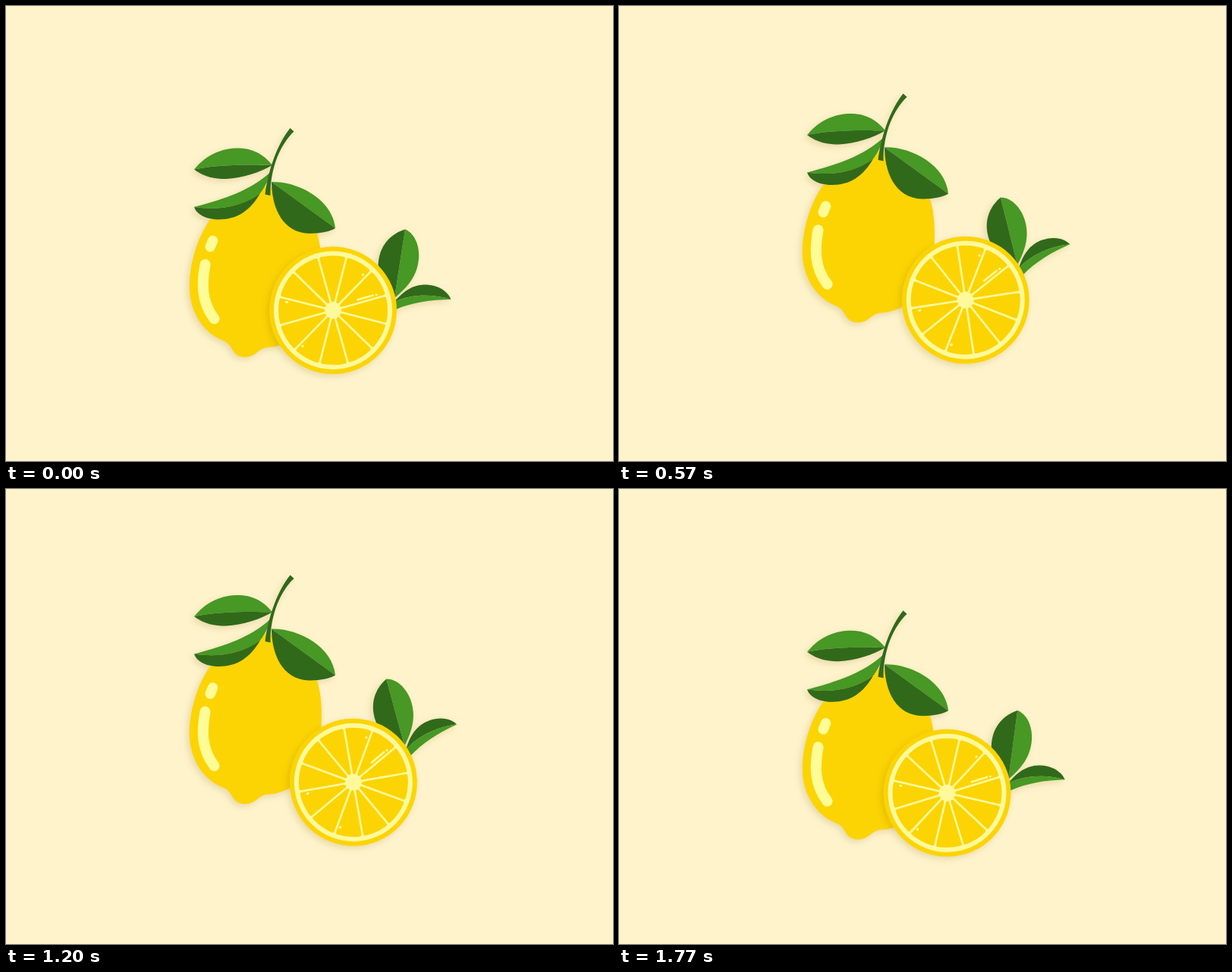
An HTML page for the animation above (1800 ms loop, 800 by 600 pixels).

```html
<!DOCTYPE html>
<html lang="en">
<head>
<meta charset="utf-8">
<title>Lemons</title>
<style>
  html, body { margin: 0; width: 100%; height: 100%; overflow: hidden; background: #fef3cb; }
  svg { display: block; width: 800px; height: 600px; }
  .lift { filter: drop-shadow(-3px 3px 4px rgba(120, 85, 0, .17)); }
  .peel { fill: #fcd404; }
  .pale { fill: #fff99c; }
  .light { fill: #479824; }
  .dark { fill: #31691b; }
  .shine { fill: none; stroke: #fffb97; stroke-linecap: round; }
  .wedge { fill: #fcd404; stroke: #fcd404; stroke-width: 4; stroke-linejoin: round; }
</style>
</head>
<body>
<svg viewBox="0 0 800 600">
  <g class="lift">
    <g id="lemon">
      <path class="peel" d="M343 237C372 250 402 275 410 300C418 325 416.500 360 414 372C411 390 403 415 385 434C375 443 362 449 347 450C337 450 333 456 326 460C320 463.500 312 464 306 461C298 457 297 446 288 442C264 433 248 412 243 385C238 355 249 310 268 283C288 262 322 252 343 237Z"/>
      <path class="shine" stroke-width="13.5" d="M272.500 309.500L269.200 317.500"/>
      <path class="shine" stroke-width="14" d="M262.500 341C258 365 257 390 274.500 412.500"/>

      <path class="light" d="M248 215.500C266 194 287 187 308 187.500C328 188 343 199 351 210C320 209 280 209 248 215.500Z"/>
      <path class="dark" d="M248 215.500C280 209 320 209 351 210C335 219 312 227 290 228C275 228 262 226 248 215.500Z"/>

      <path class="light" d="M248 265C290 254 322 243 348 219.500C346 230 341 239 335 247C312 264 282 270 248 265Z"/>
      <path class="dark" d="M248 265C282 270 312 264 335 247C322 270 304 281.500 281 281.500C264 281.500 251 275 248 265Z"/>

      <path class="light" d="M350 232C385 231 430 255 434 293Z"/>
      <path class="dark" d="M350 232C350 262 362 299 400 300C415 300 428 297 434 293Z"/>

      <path class="dark" d="M374.500 161L379.500 165.500C363 181 348 212 348.500 250L341.500 248.500C345.500 217 357 183 374.500 161Z"/>
    </g>
  </g>

  <g class="lift">
    <g class="swing">
      <path class="light" d="M526 294.500C541 301 545 320 544 333C542 356 530 370 512 385Z"/>
      <path class="dark" d="M526 294.500C502 302 490 322 490.500 345C492 360 500 375 512 385Z"/>
      <path class="dark" d="M512 390C530 368 546 367 555 367.500C575 369 584 380 586.500 387C565 380 535 379 512 390Z"/>
      <path class="light" d="M512 390C535 379 565 380 586.500 387C560 387 535 391 514 400L505 400Z"/>
    </g>
  </g>

  <g class="lift">
    <g class="swing">
      <g transform="translate(431 401.3)">
        <circle class="peel" r="84"/>
        <circle class="pale" r="78"/>
        <g id="wedges"></g>
        <path class="shine" stroke-width="2.6" d="M32.500 -14L53 -19.800"/>
        <circle class="pale" cx="57.3" cy="-20.5" r="1.6"/>
        <circle class="pale" cx="39.5" cy="-47" r="1.6"/>
        <ellipse class="pale" cx="-61" cy="-10.8" rx="2.2" ry="1.6"/>
        <circle class="pale" cx="-40" cy="47.2" r="1.8"/>
      </g>
    </g>
  </g>
</svg>
<script>
  const LOOP = 1800, STEP = 30, PEAK = 900;
  const RISE = 72, FALL_END = 1778;
  const SWING = 36, PIVOT = '410.1 330.8';

  const lemon = document.getElementById('lemon');
  const swings = document.querySelectorAll('.swing');
  const wedges = document.getElementById('wedges');

  for (let i = 0; i < 12; i++) {
    const wedge = document.createElementNS('http://www.w3.org/2000/svg', 'path');
    wedge.setAttribute('class', 'wedge');
    wedge.setAttribute('d', 'M12.75 0L68.4 -14.9A70 70 0 0 1 68.4 14.9Z');
    wedge.setAttribute('transform', `rotate(${i * 30 - 0.8})`);
    wedges.append(wedge);
  }

  // Linear up to 1 at PEAK, then linear down to 0 at end.
  const triangle = (t, end) =>
    t < PEAK ? t / PEAK : Math.max(0, (end - t) / (end - PEAK));

  function draw(now) {
    const t = Math.floor((now % LOOP) / STEP) * STEP;
    lemon.setAttribute('transform', `translate(0 ${-RISE * triangle(t, FALL_END)})`);
    const turn = `rotate(${-SWING * triangle(t, LOOP)} ${PIVOT})`;
    for (const part of swings) part.setAttribute('transform', turn);
  }

  const start = performance.now();
  function tick() {
    draw(performance.now() - start);
    requestAnimationFrame(tick);
  }
  tick();
</script>
</body>
</html>
```
